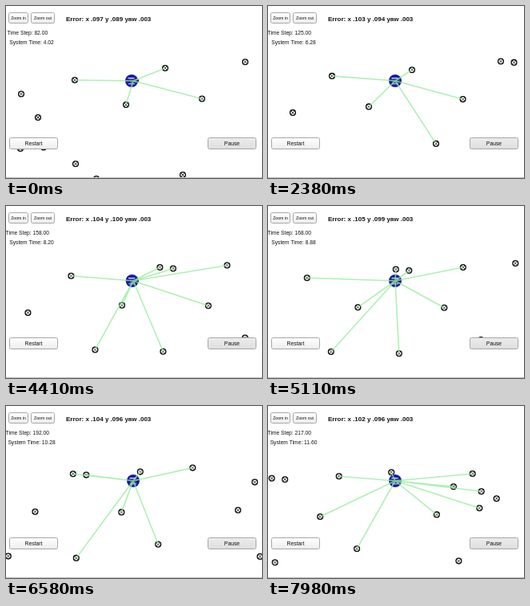
An HTML page with a canvas for the animation above (8000 ms loop, 320 by 216 pixels).

```html
<!DOCTYPE html>
<html lang="en">
<head>
<meta charset="utf-8">
<title>Vehicle localization</title>
<style>
  html, body { margin: 0; width: 100%; height: 100%; overflow: hidden; background: #fff; }
  canvas { display: block; width: 320px; height: 216px; }
</style>
</head>
<body>
<canvas id="stage"></canvas>
<script>
const canvas = document.getElementById('stage');
const ctx = canvas.getContext('2d');
const ratio = window.devicePixelRatio || 1;
canvas.width = 320 * ratio;
canvas.height = 216 * ratio;

const LOOP = 8000, TICK = 70, SENSOR_RANGE = 122.5;
const FONT = '"Liberation Sans", Arial, sans-serif';
const car = { x: 159, y: 94 };

// Values at the given ticks; everything between is interpolated.
const keys = {
  tick:   [0, 19, 34, 53, 73, 94, 114],
  scroll: [0, 67.3, 119, 185, 250.2, 326.2, 405.3],
  drift:  [0, 6.6, 9.9, 14.9, 20, 25.6, 31.2],
  step:   [82, 107, 125, 147, 168, 192, 217],
  errorX: [97, 104, 103, 102, 105, 104, 102],
  errorY: [89, 91, 94, 100, 99, 96, 96],
  lag:    [2, 2.2, 0, 2.8, 0, 0, 0]
};

const landmarks = [
  [86, 93], [199, 78], [299, 70.3], [245, 116.5], [150, 124], [19, 110.5],
  [40, 140], [18, 179], [47, 177.5], [87, 198.3], [113, 217], [221, 212],
  [410, 59.6], [426.5, 61], [362.6, 107.2], [329, 163], [494, 57],
  [470.5, 107.8], [414, 165.3], [559.5, 52], [516.4, 148.1], [637.2, 70],
  [616.2, 105.2], [643.7, 163.4], [661, 53.8], [672, 76], [691, 85], [669.6, 97]
];

function valueAt(name, tick) {
  const ticks = keys.tick, values = keys[name];
  let i = 0;
  while (i < ticks.length - 2 && tick >= ticks[i + 1]) i++;
  const part = (tick - ticks[i]) / (ticks[i + 1] - ticks[i]);
  return values[i] + part * (values[i + 1] - values[i]);
}

function label(text, x, y, size, align = 'center', weight = '') {
  ctx.font = `${weight} ${size}px ${FONT}`;
  ctx.textAlign = align;
  ctx.fillStyle = '#111';
  ctx.fillText(text, x, y);
}

function button(text, x, y, w, h, size, top, bottom) {
  const shade = ctx.createLinearGradient(0, y, 0, y + h);
  shade.addColorStop(0, top);
  shade.addColorStop(1, bottom);
  ctx.beginPath();
  ctx.roundRect(x, y, w, h, 2);
  ctx.fillStyle = shade;
  ctx.fill();
  ctx.strokeStyle = '#a8a8a8';
  ctx.lineWidth = 1;
  ctx.stroke();
  label(text, x + w / 2, y + h / 2 + size * 0.36, size);
}

function segments(color, width, ...lines) {
  ctx.strokeStyle = color;
  ctx.lineWidth = width;
  ctx.beginPath();
  for (const [x1, y1, x2, y2] of lines) {
    ctx.moveTo(x1, y1);
    ctx.lineTo(x2, y2);
  }
  ctx.stroke();
}

function drawLandmark([x, y]) {
  ctx.beginPath();
  ctx.arc(x, y, 3.4, 0, Math.PI * 2);
  ctx.strokeStyle = '#000';
  ctx.lineWidth = 1.3;
  ctx.stroke();
  segments('#222', 0.9, [x - 2, y - 2, x + 2, y + 2], [x - 2, y + 2, x + 2, y - 2]);
}

function drawCar(lag) {
  const x = car.x - lag, y = car.y;
  ctx.fillStyle = '#1c1ca4';
  ctx.beginPath();
  ctx.arc(x, y, 8, 0, Math.PI * 2);
  ctx.fill();
  segments('#dfe6f5', 1.1, [x - 4.5, y - 3.4, x + 3.5, y - 3.4], [x - 4, y + 3.8, x + 4, y + 3.8]);
  segments('#101060', 3.2, [car.x - 6, y, car.x + 7, y]);
  segments('#3f8f9c', 1.1, [car.x - 5, y - 1, car.x + 6, y - 1], [car.x - 4, y + 1.5, car.x + 4, y + 1.5]);
}

function draw(tick) {
  const scroll = valueAt('scroll', tick), drift = valueAt('drift', tick);
  const marks = landmarks
    .map(([x, y]) => [x - scroll, y + drift])
    .filter(([x]) => x > -6 && x < 326);
  const seen = marks.filter(([x, y]) => Math.hypot(x - car.x, y - car.y) < SENSOR_RANGE);

  ctx.setTransform(ratio, 0, 0, ratio, 0, 0);
  ctx.fillStyle = '#fff';
  ctx.fillRect(0, 0, 320, 216);

  marks.forEach(drawLandmark);
  drawCar(valueAt('lag', tick));
  segments('rgba(150, 238, 155, .78)', 1.6, ...seen.map(([x, y]) => [car.x, car.y, x, y]));

  ctx.fillStyle = '#c4c4c4';
  ctx.fillRect(0, 215, 320, 1);

  button('Zoom in', 3.5, 8.5, 24, 13, 5.2, '#fff', '#ececec');
  button('Zoom out', 31.5, 8.5, 29, 13, 5.2, '#fff', '#ececec');
  button('Restart', 4.5, 165.5, 60, 14, 6.8, '#fff', '#ededed');
  button('Pause', 252.5, 165.5, 60, 14, 6.8, '#ececec', '#dedede');

  const decimals = name => '.' + String(Math.round(valueAt(name, tick))).padStart(3, '0');
  const clock = 4.02 + Math.floor(tick * 3.33) * 0.02;
  label(`Error: x ${decimals('errorX')} y ${decimals('errorY')} yaw .003`, 75, 19, 8, 'left', 'bold');
  label(`Time Step: ${Math.round(valueAt('step', tick)).toFixed(2)}`, 26.8, 36.3, 6.7);
  label(`System Time: ${clock.toFixed(2)}`, 32, 47.8, 6.7);
}

function frame() {
  draw(Math.floor((performance.now() % LOOP) / TICK));
  requestAnimationFrame(frame);
}
frame();
</script>
</body>
</html>
```
